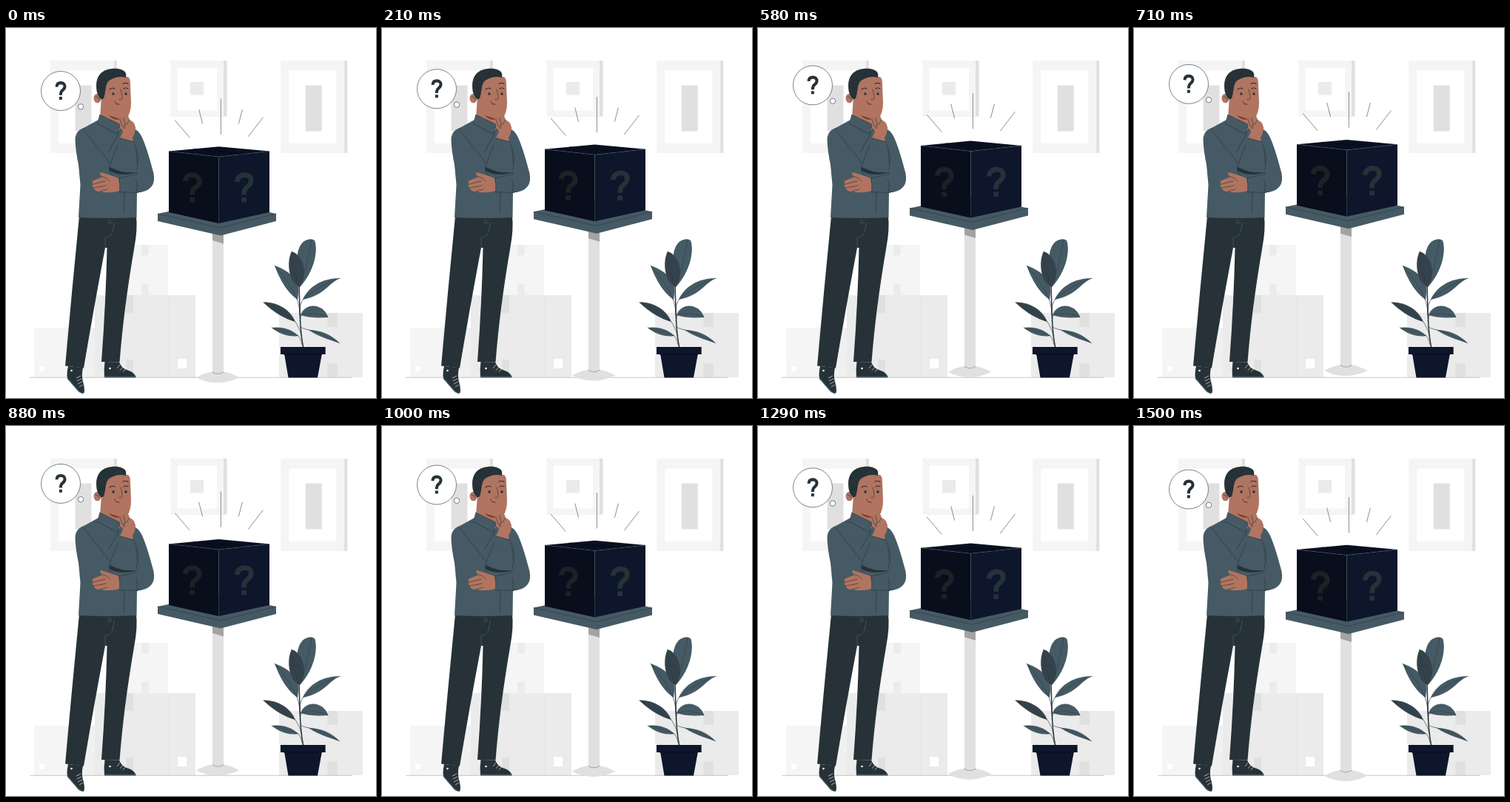
These frames come from a looping animation (500x500 px, 1540 ms). An HTML page:

```html
<!DOCTYPE html>
<html lang="en">
<head>
<meta charset="utf-8">
<title>Mystery box</title>
<style>
  html, body { margin: 0; width: 100%; height: 100%; overflow: hidden; background: #fff; }
  svg { display: block; width: 100vw; height: 100vh; }
  .line { fill: none; stroke: #263238; stroke-width: .6; stroke-linecap: round; stroke-linejoin: round; }
  .ink { fill: #263238; }
  .cloth { fill: #455a64; }
  .skin { fill: #b07460; }
  .pale { fill: #f5f5f5; }
  .grey { fill: #ebebeb; }
  .mid { fill: #e0e0e0; }
  .white { fill: #fff; }
  .navy { fill: #0d162b; }
</style>
</head>
<body>
<svg viewBox="0 0 500 500">
  <defs>
    <g id="picture">
      <path class="mid" d="M4 0H90V125H4Z"/>
      <path class="pale" d="M0 0H86V125H0Z"/>
      <path d="M0 0L11 13.5M86 0L75 13.5M0 125L11 112M86 125L75 112" stroke="#ebebeb" stroke-width=".6"/>
      <path class="white" d="M11 13.5H75V112H11Z"/>
      <path class="mid" d="M33.5 33.5H55.5V95.5H33.5Z"/>
    </g>
    <g id="mark">
      <path d="M-9.600 -7.500C-9.300 -13 -5.500 -16.300 .3 -16.300C6 -16.300 9.500 -13 9.500 -8.300C9.500 -4 6.500 -1.500 3.500 .6C.5 2.800 -.2 5 -.2 10.500" fill="none" stroke="currentColor" stroke-width="6.800"/>
      <path d="M-3.600 14H3.200V20.500H-3.600Z" fill="currentColor"/>
    </g>
  </defs>

  <!-- wall -->
  <use href="#picture" x="60" y="44"/>
  <use href="#picture" x="371.300" y="44"/>
  <path class="mid" d="M227 44H298.500V119.500H227Z"/>
  <path class="pale" d="M222.500 44H294V119.500H222.500Z"/>
  <path d="M222.500 44L231.500 54M294 44L285 54M222.500 119.500L231.500 111.500M294 119.500L285 111.500" stroke="#ebebeb" stroke-width=".6"/>
  <path class="white" d="M231.500 54H285V111.500H231.500Z"/>
  <path class="grey" d="M249 73H267V90.500H249Z"/>

  <!-- cartons -->
  <path class="pale" d="M152 293H219V361H152Z"/>
  <path class="grey" d="M183 293H192.500V307H183ZM183 346H192.500V361H183Z"/>
  <path class="pale" d="M38 405H122V472H38Z"/>
  <path d="M82 405H122V472H82Z" fill="#f0f0f0"/>
  <path class="white" d="M45 457H52V464H45Z"/>
  <path class="grey" d="M120 361H256V472H120Z"/>
  <path d="M219.500 361V472" stroke="#e2e2e2" stroke-width=".7"/>
  <path class="mid" d="M162 361H172V385H162ZM162 448H172V472H162Z"/>
  <path class="white" d="M232 447H244V460H232Z"/>
  <path class="grey" d="M369 385H482V472H369Z"/>
  <path class="mid" d="M434.500 385H448V404H434.500ZM434.500 453.500H448V472H434.500Z"/>
  <path d="M32.500 472.300H467.500" stroke="#a9aeb1" stroke-width=".7"/>

  <!-- plant -->
  <path d="M402 433C397 410 397 380 396 345" fill="none" stroke="#263238" stroke-width="1.500"/>
  <path class="line" d="M393 366Q397 376 397 388M402 366Q397 372 397 384M391 397Q398 408 399 416M399 388L397 396M394 415Q399 420 400 428M410 408Q402 407 398 404"/>
  <g class="cloth">
    <path d="M398 349C390 325 391 296 403 288Q411 283 417 287C422 300 417 328 398 349Z"/>
    <path d="M394 367C384 360 373 348 363 321C378 326 395 338 395 350Q396 358 394 367Z"/>
    <path d="M401 367C409 350 426 338 452 338C438 342 432 361 401 367Z"/>
    <path d="M398 388C404 371 428 371 435.500 391C424 392 408 391.500 398 388Z"/>
    <path d="M395 416C383 418 370 414 359 405C373 403 386 407 395 416Z"/>
    <path d="M409 408C424 408 440 414 451 426C436 421 422 417 409 408Z"/>
  </g>
  <path d="M397 350C383 345 378 318 386 302C397 304 411 328 397 350Z" fill="#34434b"/>
  <path d="M391 397C378 394 361 384 347.500 370.500C366 370 384 380 391 397Z" fill="#34434b"/>
  <path class="line" style="stroke-width:.4" d="M398 349Q407 320 413 286M397 350Q387 328 386 302M394 367Q382 342 363 321M401 367Q423 347 452 338M398 388Q418 382 435 391M391 397Q371 381 348 371M395 416Q379 409 359 405M409 408Q432 414 451 426"/>
  <path class="navy" d="M376 440H427L421 472.500H381.500Z"/>
  <path class="navy" d="M371 431H431.700V441H371Z"/>
  <path d="M375 441H427" stroke="#050914" stroke-width=".7"/>

  <!-- podium and thought bubble -->
  <g id="float">
    <path class="mid" d="M257 472.300Q270 465 279 464.500H294Q304 466 315.500 472.300Q300 479.500 286 479.500Q270 479.500 257 472.300Z"/>
    <path class="mid" d="M279 276H294V465Q287 470 279 465Z"/>
    <path class="line" style="stroke:#777" d="M279 465Q286.500 470 294 465"/>
    <path d="M279 276H294V291.500L279 287Z" fill="#a3a3a3"/>
    <path class="cloth" d="M205 251L286 234L365 251V261L290 280.500L205 261Z"/>
    <path class="line" style="stroke-width:.5" d="M205 251L289.500 270L365 251"/>
    <path d="M220 166.500L287.500 160.200L356 166.500L287.500 174Z" fill="#080f20"/>
    <path d="M220 166.500L287.500 174V264L220 249Z" fill="#080e1b"/>
    <path class="navy" d="M287.500 174L356 166.500V249L287.500 264Z"/>
    <path d="M220 166.500L287.500 174L356 166.500M287.500 174V264" fill="none" stroke="#40505b" stroke-width=".5"/>
    <path d="M253 163.400L321 170.300" stroke="#050914" stroke-width=".6"/>
    <use href="#mark" transform="translate(251.800 215) skewY(3)" color="#1a2226"/>
    <use href="#mark" transform="translate(321.800 215) skewY(-3)" color="#263238"/>
    <path class="line" style="stroke-width:.55" d="M290.400 96V143.500M260.800 110.500L265.500 129M319.300 110.500L314.500 129M228.500 125L248 147.800M347.200 121L327.500 146.500"/>
    <circle cx="74" cy="85" r="26.500" class="white" stroke="#263238" stroke-width=".6"/>
    <circle cx="101" cy="106.300" r="3.700" class="white" stroke="#263238" stroke-width=".6"/>
    <use href="#mark" transform="translate(74 84.200) scale(.58 .62)" color="#263238"/>
  </g>

  <!-- shoes and trousers -->
  <path class="ink" d="M84 457L104 459Q102 468 103.500 476Q107 488 105.500 493Q102 495 98 491L84 475Q81 471 84 457Z"/>
  <path class="ink" d="M133.500 451L153 451.500Q156 459 162 461.500Q175 465.500 175.500 472.300H133Q132 462 133.500 451Z"/>
  <path d="M83 473L98 490.500Q102 494 105 493M133 471.500H175.500" fill="none" stroke="#455a64" stroke-width="1.300"/>
  <path d="M95 473L101 470M95.500 477L102 474M97 481L103 478M99 485L104 482M150 460L154 455M154 463L158 458M158 465L161 461" fill="none" stroke="#fff" stroke-width=".6"/>
  <circle cx="88.500" cy="463" r="1.300" class="white"/>
  <circle cx="140.500" cy="460" r="1.300" class="white"/>
  <path class="ink" d="M99 254H176Q178 272 173.500 296Q159 380 153.500 451.500L129 451Q135 370 136.500 297H134Q118 382 105 459.500L80 456.500Q89 355 99 254Z"/>
  <path class="line" style="stroke:#56666f" d="M146 263Q145 277 141 280Q138 283 134 283L134 297"/>
  <circle cx="140" cy="262" r="2.300" fill="none" stroke="#56666f" stroke-width=".6"/>

  <!-- head -->
  <path class="skin" d="M129 92L136 66H165Q168 68 168 76L169 100Q169 114 164 121L155 126L156 139L127 122Z"/>
  <ellipse cx="123.500" cy="95" rx="5" ry="6.300" class="skin"/>
  <path class="line" d="M121 93Q124 92 126 97"/>
  <path class="ink" d="M127.500 95.500Q122 90 122 78C122 66 128 58.500 137 56.200C146 53.300 157 54.500 161 59.500Q163 62.500 162 67Q151 64.500 143 69Q136.500 71 135 80Q133.500 91 132 95Q129.500 97 127.500 95.500Z"/>
  <path d="M139 118Q145 125 155 123.500Q148 121 139 118Z" fill="#7e3a2c"/>
  <circle cx="145" cy="89" r="1.700" class="ink"/>
  <circle cx="162" cy="89" r="1.700" class="ink"/>
  <path class="line" style="stroke-width:1.100" d="M140 83Q143 80 147 82M158 75.500Q162 73 165 75.500M159 82Q162 80 165 82"/>
  <path class="line" d="M155 83Q157 90 157 96Q155 98 152.500 96.500"/>
  <path class="line" style="stroke-width:.9" d="M147 99Q148 104 153 103"/>

  <!-- shirt -->
  <path class="cloth" d="M125 124L151 140L158 133L171 135Q179 137.500 184 148Q191 164 198 191Q203 207 196 215Q190 222 177 222.500L176.500 256Q138 258 98 256L100.500 212L98 185Q94 166 93.500 152Q93 139 106 134.500Z"/>
  <path class="cloth" d="M126.500 117L154.500 130.500L151 143.500L123 129Z"/>
  <path class="line" d="M126.500 117L154.500 130.500L151 143.500L123 129M105 138L140 182M152 143L139 167M160 222Q160 240 159 251M176 163Q181 179 176 193M177 222Q178 212 176 205M154 150L141 184Q137 193 144 199"/>
  <path d="M139 192Q152 202 178 195Q156 197 141 188Z" fill="#263238"/>
  <path class="line" stroke-dasharray="3 2" d="M172 153Q177 163 177 184"/>
  <path d="M152 220.500Q168 223 187 220L177 223L154 222.500Z" fill="#37474f"/>

  <!-- hands -->
  <path class="skin" d="M153 150L158 140Q152 130 153 121Q153 115 157 117L159 121Q160 115 163 117Q166 119 167 124Q173 126 175 134Q175 142 171 148L172 154Z"/>
  <path class="line" d="M159 121L161 131M167 124L163 130Q159 130 160 136M154 123Q156 131 159 135"/>
  <path class="cloth" d="M153.500 148.500L173 154L170 164L150 157Z"/>
  <path class="line" d="M153.500 148.500L173 154"/>
  <path class="skin" d="M152.500 203L138 198L128 195Q125 197 131 201L118 206Q115 209 118 211Q115 214 119 216Q119 221 127 221Q140 224 154 220Z"/>
  <path class="line" d="M131 201Q138 203 140 207M118 211L134 207M119 216L135 213M127 221L137 218"/>
  <path class="line" d="M152.500 203Q155 211 153.500 220.500M152.500 203Q170 200 178 196"/>
</svg>
<script>
  const LOOP = 1540, FPS = 24, RISE = 10, LEAD = 59;
  const float = document.getElementById('float');

  // Linear rise and fall, held at 24 steps per second.
  function offset(ms) {
    const step = Math.min(36, Math.floor((ms + 4.99) * FPS / 1000));
    const phase = ((step * 1000 / FPS + LEAD) % LOOP) / LOOP;
    const height = 1 - Math.abs(2 * phase - 1);
    return RISE * (2 * LEAD / LOOP - height);
  }

  let start;
  function draw(now) {
    start ??= now;
    float.setAttribute('transform', `translate(0 ${offset((now - start) % LOOP).toFixed(3)})`);
    requestAnimationFrame(draw);
  }
  requestAnimationFrame(draw);
</script>
</body>
</html>
```
